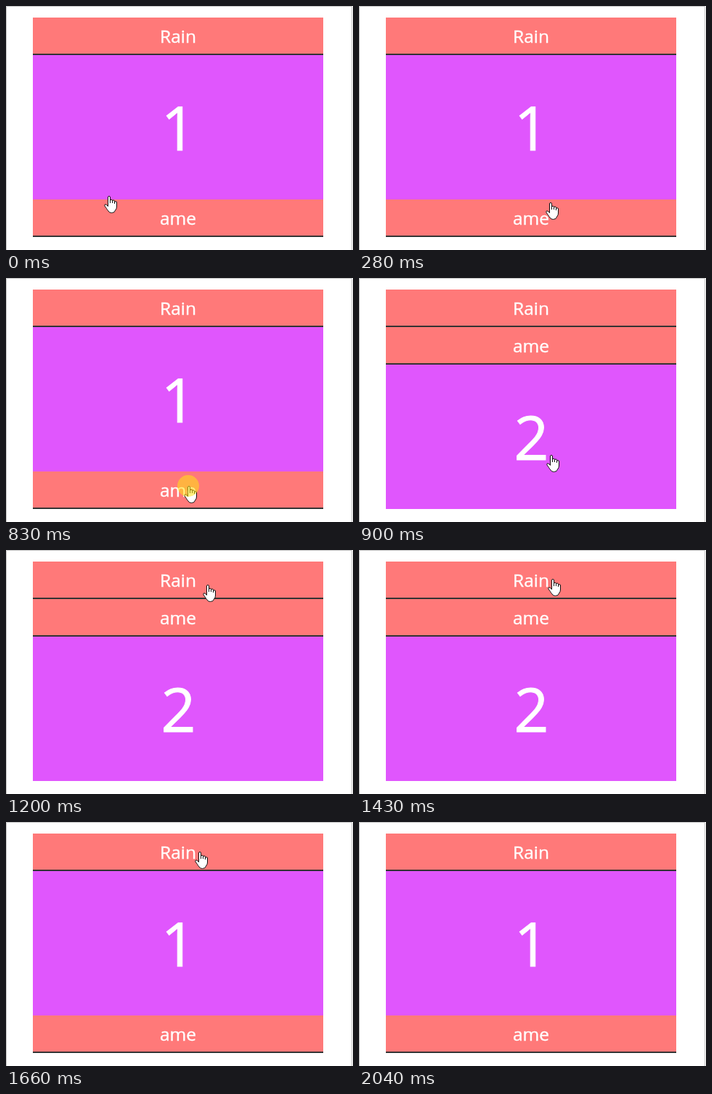
Write an HTML page that moves like this. It is 478 px wide and 338 px high and loops after 2440 ms.

```html
<!DOCTYPE html>
<html lang="en">
<head>
<meta charset="utf-8">
<title>Accordion</title>
<style>
  html, body { margin: 0; width: 100%; height: 100%; overflow: hidden; background: #fff; }
  svg { display: block; width: 478px; height: 338px; }
  text { fill: #fff; stroke: #fff; text-anchor: middle; font-family: "Open Sans", "Noto Sans", sans-serif; }
  .title { font-size: 24.5px; stroke-width: .4px; }
  .number { font-size: 84px; stroke-width: .9px; }
  .bar { fill: #ff7979; }
  .rule { fill: #333; }
</style>
</head>
<body>
<svg viewBox="0 0 478 338">
  <path d="M.5 338V.5H476.5V338" fill="none" stroke="#c4c4c4"/>

  <rect class="bar" x="37" y="16" width="400" height="50"/>
  <rect class="rule" x="37" y="66" width="400" height="2"/>
  <text class="title" x="237" y="51">Rain</text>

  <g id="panel">
    <rect x="37" y="68" width="400" height="200" fill="#e056fd"/>
    <text id="number" class="number" x="237.5" y="199.6">1</text>
  </g>

  <g id="second">
    <rect class="bar" x="37" y="68" width="400" height="50"/>
    <rect class="rule" x="37" y="118" width="400" height="2"/>
    <text class="title" x="237" y="103">ame</text>
  </g>

  <path id="cursor" fill="#fff" stroke="#111" stroke-linejoin="round"
    d="M5.5 14.5V2a1.5 1.5 0 0 1 3 0V10V6.5a1.5 1.3 0 0 1 3 0V10V7.3a1.5 1.3 0 0 1 3 0V11V9a1.5 1.3 0 0 1 3 0V15Q17.5 18 15.5 20Q15 23.5 10.5 23.5Q7 23.5 6 21Q4.5 19.5 3.5 17.5L.8 13.8Q.6 11 3.2 12Z"/>
  <circle id="press" r="15" fill="#ffe414" fill-opacity=".55"/>
</svg>
<script>
  const LOOP = 2440;
  // Pointer path: time, fingertip x, fingertip y
  const stops = [
    [0, 142, 264], [370, 302, 276], [520, 266, 278], [670, 252, 290], [830, 252, 290],
    [1120, 307, 110], [1200, 278, 49], [1430, 267, 41], [1660, 267, 41], [2040, 240, 345]
  ];
  const [panel, second, number, cursor, press] =
    ["panel", "second", "number", "cursor", "press"].map(id => document.getElementById(id));
  const place = (node, x, y) => node.setAttribute("transform", `translate(${x} ${y})`);
  const within = (t, from, to) => t >= from && t < to;

  function pointerAt(t) {
    const next = stops.findIndex(([time]) => time > t);
    if (next < 0) return stops.at(-1).slice(1);
    const [t0, x0, y0] = stops[next - 1];
    const [t1, x1, y1] = stops[next];
    const part = (t - t0) / (t1 - t0);
    return [x0 + (x1 - x0) * part, y0 + (y1 - y0) * part].map(Math.round);
  }

  function draw(now) {
    const t = now % LOOP;
    const secondOpen = within(t, 900, 1660);
    place(panel, 0, secondOpen ? 52 : 0);
    place(second, 0, secondOpen ? 0 : 200);
    number.textContent = secondOpen ? "2" : "1";

    const [x, y] = pointerAt(t);
    place(cursor, x - 7, y - 1);
    place(press, x - 1, y - 1);
    const pressed = within(t, 830, 900) || within(t, 1510, 1580);
    press.setAttribute("visibility", pressed ? "visible" : "hidden");
  }

  const start = performance.now();
  function tick() {
    draw(performance.now() - start);
    requestAnimationFrame(tick);
  }
  tick();
</script>
</body>
</html>
```
